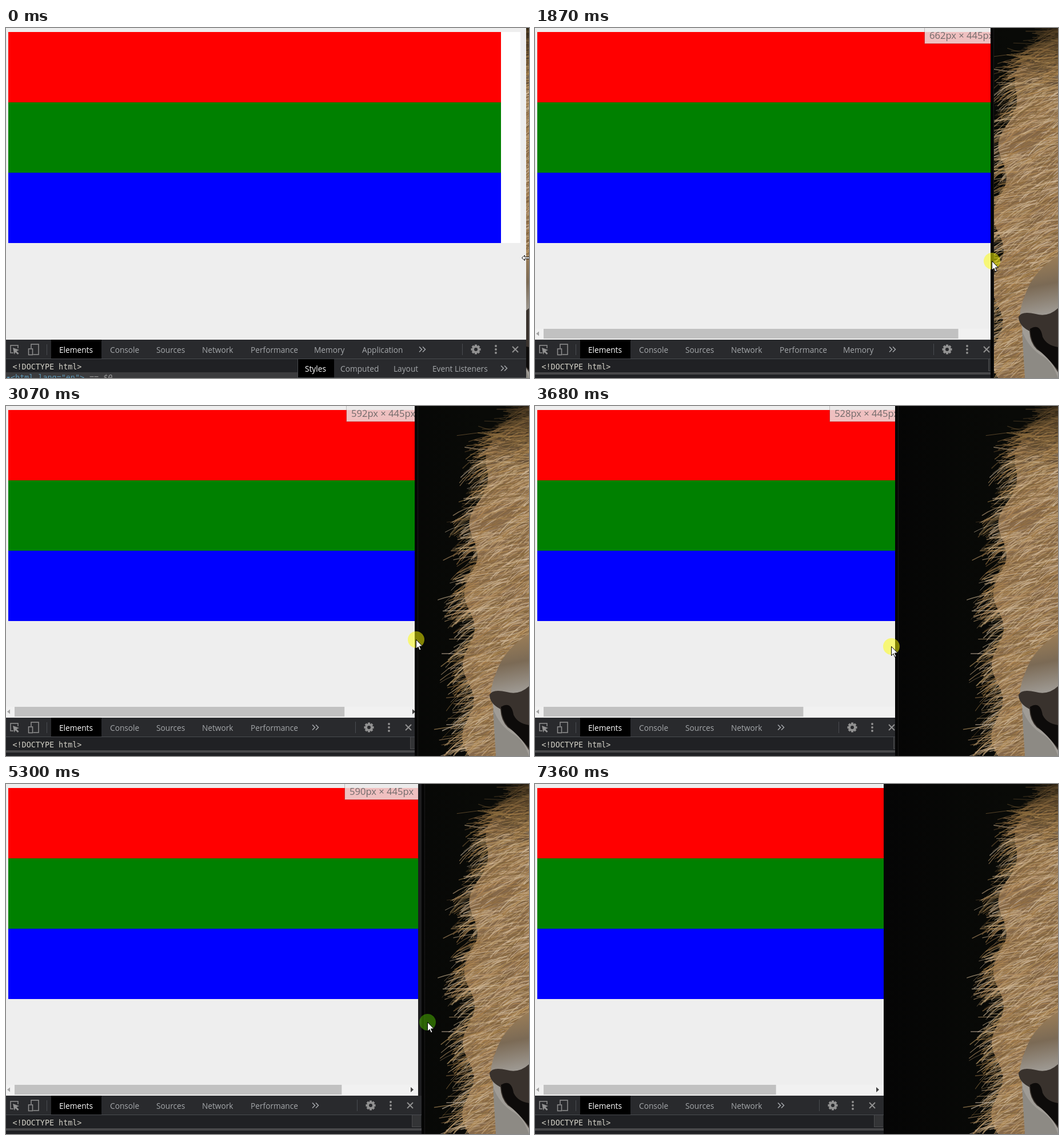
Animation, 915 px wide and 612 px high, one loop 7570 ms. Source, as an HTML page with a canvas:

```html
<!DOCTYPE html>
<html lang="en">
<head>
<meta charset="utf-8">
<style>
  html, body { margin: 0; width: 100%; height: 100%; overflow: hidden; background: #060705; }
  canvas { display: block; }
</style>
</head>
<body>
<canvas id="stage" width="915" height="612"></canvas>
<script>
const WIDTH = 915, HEIGHT = 612, LOOP = 7570, STEPS = 37;
const RELEASE = 31, CONTENT = 873;
const ctx = document.getElementById('stage').getContext('2d');
const SANS = '"Open Sans", "Noto Sans", sans-serif';
const MONO = '"DejaVu Sans Mono", monospace';
const GREY = '#919191', LABEL = '#a5a8ab', BORDER = '#494c50';

// Turning points of the drag: the layout trails the window edge
const DRAG = [
  { step: 0, edge: 910, layout: 910, x: 908, y: 402 },
  { step: 5, edge: 852, layout: 860, x: 852, y: 405 },
  { step: 9, edge: 797, layout: 809, x: 799, y: 407 },
  { step: 15, edge: 715, layout: 723, x: 717, y: 408 },
  { step: 18, edge: 630, layout: 643, x: 623, y: 420 },
  { step: 20, edge: 610, layout: 609, x: 610, y: 420 },
  { step: 24, edge: 610, layout: 609, x: 610, y: 418 },
  { step: 26, edge: 727, layout: 726, x: 737, y: 416 },
  { step: 30, edge: 610, layout: 609, x: 612, y: 416 },
  { step: RELEASE, edge: 610, layout: 609, x: 612, y: 416 },
  { step: STEPS - 1, edge: 610, layout: 609, x: 937, y: 646 }
];

// Left edge of each tab; the last entry is where another one would start
const TABS = [['Elements', 93], ['Console', 182], ['Sources', 263], ['Network', 343],
  ['Performance', 428], ['Memory', 539], ['Application', 623], ['', 726]];

function poseAt(step) {
  const i = Math.max(1, DRAG.findIndex(key => key.step >= step));
  const a = DRAG[i - 1], b = DRAG[i];
  const k = (step - a.step) / (b.step - a.step);
  const mix = name => Math.round(a[name] + (b[name] - a[name]) * k);
  const layout = mix('layout');
  const page = layout + (b.edge > a.edge ? -5 : 1);
  return { edge: mix('edge'), layout, page, x: mix('x'), y: mix('y') };
}

function rect(x, y, w, h, color, c = ctx) {
  c.fillStyle = color;
  c.fillRect(x, y, w, h);
}

function text(str, x, y, color, font = `13.7px ${SANS}`) {
  ctx.font = font;
  ctx.fillStyle = color;
  ctx.fillText(str, x, y);
}

function line(points, color, width = 1.5, c = ctx) {
  c.strokeStyle = color;
  c.lineWidth = width;
  c.beginPath();
  points.forEach(([x, y]) => c.lineTo(x, y));
  c.stroke();
}

function shape(path, color, c = ctx) {
  c.fillStyle = color;
  c.fill(new Path2D(path));
}

function disc(x, y, r, color) {
  ctx.fillStyle = color;
  ctx.beginPath();
  ctx.arc(x, y, r, 0, 7);
  ctx.fill();
}

function gradient(c, box, ...colors) {
  const g = c.createLinearGradient(...box);
  colors.forEach((color, i) => g.addColorStop(i / (colors.length - 1), color));
  return g;
}

// Soft impression of a lion's mane against a dark background
function paintPhoto() {
  const photo = document.createElement('canvas');
  photo.width = WIDTH;
  photo.height = HEIGHT;
  const c = photo.getContext('2d');
  let seed = 11;
  const random = () => (seed = seed * 16807 % 2147483647) / 2147483647;
  const maneEdge = y => 800 + 95 * Math.exp(-y / 100) - 10 * Math.cos((y - 75) / 20);
  const light = y => Math.min(1, 0.35 + y / 150);

  rect(0, 0, WIDTH, HEIGHT, gradient(c, [610, 0, 830, 0], '#050505', '#090a07'), c);

  c.fillStyle = gradient(c, [0, 0, 0, 130], '#1c1811', '#86694a');
  c.beginPath();
  for (let y = 0; y <= HEIGHT; y += 4) c.lineTo(maneEdge(y) + 8, y);
  c.lineTo(WIDTH, HEIGHT);
  c.lineTo(WIDTH, 0);
  c.fill();

  c.lineCap = 'round';
  for (let i = 0; i < 3000; i++) {
    const y = random() * HEIGHT - 10, left = maneEdge(y) + 6;
    const x = left + random() * (960 - left);
    const reach = (18 + random() * 30) * (random() < 0.03 ? 1.8 : 1);
    const fall = reach * (random() * 0.9 - (y < 100 ? 0.25 : 0));
    c.strokeStyle = `hsla(${32 + random() * 5}, 38%, ${(32 + random() * 46) * light(y)}%, .6)`;
    c.lineWidth = 0.6 + random() * 1.2;
    c.beginPath();
    c.moveTo(x, y);
    c.quadraticCurveTo(x - reach * 0.5, y + fall * 0.2, x - reach, y + fall);
    c.stroke();
  }

  shape('M915 398 Q872 425 858 465 Q842 505 852 522 L860 612 H915 Z',
    gradient(c, [860, 400, 880, 505], '#a08158', '#7b6a55', '#a09c96'), c);
  shape('M852 530 Q864 560 888 574 Q905 584 915 612 H857 Z', '#8d8a84', c);
  shape('M846 505 Q851 494 876 500 Q898 506 915 490 V602 Q898 574 878 562 Q866 550 865 530 Q846 520 846 505 Z', '#39322d', c);
  shape('M866 526 Q884 515 888 540 Q895 555 915 558 V598 Q895 574 878 560 Q867 548 866 526 Z', '#0d0b0a', c);
  return photo;
}

const photo = paintPhoto();

function drawPage(width, dragging) {
  rect(0, 0, width, 545, '#eee');
  rect(4, 7, width - 15, 369, '#fff');
  ['#f00', '#008000', '#00f'].forEach((color, i) => rect(4, 7 + i * 123, 862, 123, color));
  rect(width, 0, 20, 545, '#1d1d1f');

  if (width < CONTENT) {
    rect(0, 526, width, 17, '#f1f1f1');
    rect(15, 526, (width - 28) * width / CONTENT, 17, '#c1c1c1');
    shape('M2 534.5 l5 -4 v8 z', '#a3a3a3');
    shape(`M${width - 8} 534.5 l-5 -4.5 v9 z`, '#404040');
  }
  if (dragging) {
    const pixels = Math.floor(528 + 0.811 * (width - 644));
    rect(width - 129, 0, 129, 28, 'rgba(120,110,110,.4)');
    rect(width - 128, 0, 128, 27, 'rgba(255,255,255,.7)');
    text(`${pixels}px × 445px`, width - 120, 19, '#716a6a', `16.6px ${SANS}`);
  }
}

function chevrons(x, y) {
  for (const dx of [-5, 1]) line([[x + dx, y - 4.5], [x + dx + 4.5, y], [x + dx, y + 4.5]], LABEL);
}

function drawToolbar(width) {
  rect(0, 545, WIDTH, 33, '#292a2d');
  rect(0, 578, WIDTH, 1, BORDER);
  rect(79, 545, 88, 33, '#000');
  rect(71, 553, 1, 19, BORDER);

  line([[13, 568], [8, 568], [8, 555], [21, 555], [21, 560]], GREY);
  shape('M12 559 l11 4 -4.5 2 4 4 -2 2 -4 -4 -2 4 z', GREY);
  ctx.strokeStyle = GREY;
  ctx.strokeRect(44, 553, 13, 18);
  rect(38.5, 560, 9, 12, '#292a2d');
  ctx.strokeRect(39.5, 561, 7, 10.5);

  let i = 0;
  for (; i < TABS.length - 1 && TABS[i + 1][1] + 16 <= width - 111; i++) {
    text(TABS[i][0], TABS[i][1], 567.5, i ? LABEL : '#fff');
  }
  chevrons(TABS[i][1] + 2, 562);

  rect(width - 112, 552, 1, 20, BORDER);
  const gear = width - 88, close = width - 19;
  for (let a = 0; a < 3; a += Math.PI / 4) {
    const dx = Math.cos(a) * 8.5, dy = Math.sin(a) * 8.5;
    line([[gear - dx, 562 - dy], [gear + dx, 562 + dy]], GREY, 4);
  }
  disc(gear, 562, 6.8, GREY);
  disc(gear, 562, 3, '#292a2d');
  for (const dy of [-6, 0, 6]) disc(width - 53, 562 + dy, 1.9, GREY);
  for (const d of [-5, 5]) line([[close - 5, 562 - d], [close + 5, 562 + d]], GREY, 2);
}

function drawElementsPanel(width) {
  const mono = `13.4px ${MONO}`;
  rect(0, 579, WIDTH, 33, '#202124');
  text('<!DOCTYPE html>', 11.5, 597, '#d2d0c6', mono);

  if (width < 833) {
    rect(width - 16, 579, 16, 21, '#4a4a4c');
    rect(width - 15, 579, 15, 20, '#333436');
    rect(0, 602, WIDTH, 4, '#48484a');
    return;
  }
  rect(0, 602, WIDTH, 10, '#3b3b3d');
  text('▾<html lang="en">', 0, 616, '#5f97b5', mono);
  text('== $0', 146, 616, '#9a9a9a', `italic ${mono}`);

  const left = width - 400;
  rect(left, 579, 400, 33, BORDER);
  rect(left + 1, 579, 399, 32, '#292a2d');
  rect(left + 1, 579, 63, 32, '#000');
  [['Styles', 13], ['Computed', 75], ['Layout', 168], ['Event Listeners', 236]].forEach(([name, dx], i) =>
    text(name, left + dx, 601, i ? LABEL : '#fff'));
  chevrons(left + 361, 595);
}

function drawPointer(step, x, y) {
  if (step > 0 && step <= RELEASE) {
    disc(x + 0.5, y + 0.5, 14.5, step === 26 ? 'rgba(80,190,0,.5)' : 'rgba(255,255,0,.5)');
  }
  const arrow = new Path2D(step
    ? `M${x + 0.5} ${y + 0.5} v16 l3.5 -3.5 2.5 6 2.5 -1 -2.5 -6 h5 z`
    : 'M902.5 402 l5 -4.5 v3 h9 v3 h-9 v3 z');
  ctx.fillStyle = '#fff';
  ctx.strokeStyle = '#000';
  ctx.lineWidth = 1;
  ctx.fill(arrow);
  ctx.stroke(arrow);
}

function draw(time) {
  const step = Math.min(STEPS - 1, Math.floor((time + 20) * STEPS / LOOP));
  const { edge, layout, page, x, y } = poseAt(step);
  const dragging = step > 0 && step <= RELEASE;

  ctx.drawImage(photo, 0, 0);
  if (dragging) {
    rect(edge, 0, 6, HEIGHT, '#1a1a1a');
    rect(edge, 0, 5, HEIGHT, '#050505');
  }
  ctx.save();
  ctx.beginPath();
  ctx.rect(0, 0, edge, HEIGHT);
  ctx.clip();
  drawPage(page, dragging);
  drawToolbar(layout);
  drawElementsPanel(layout);
  ctx.restore();
  drawPointer(step, x, y);
}

function loop(now) {
  draw(now % LOOP);
  requestAnimationFrame(loop);
}
draw(0);
requestAnimationFrame(loop);
</script>
</body>
</html>
```
